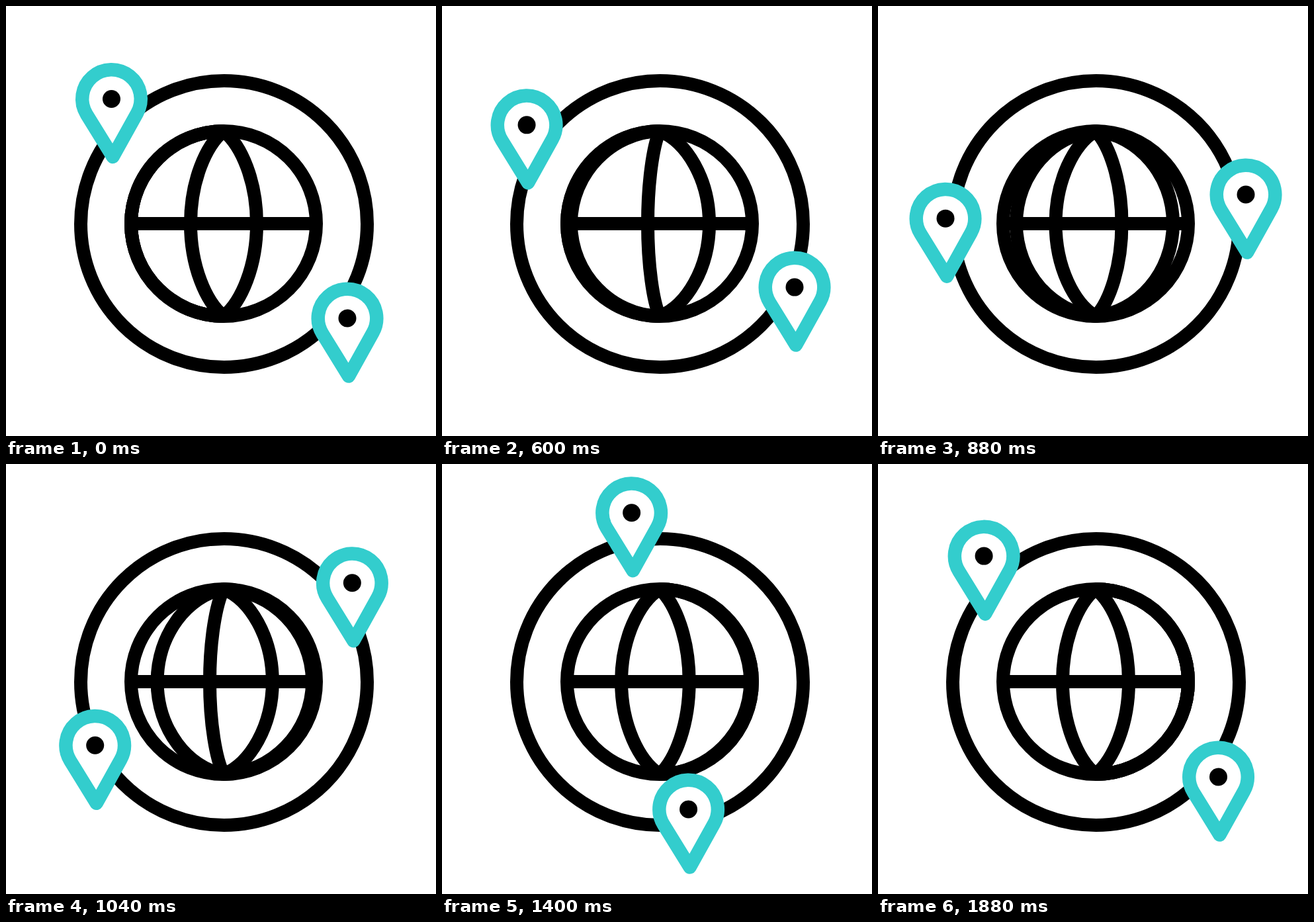
Write an HTML page that moves like this. It is 650 px wide and 650 px high and loops after 1.92 s.

```html
<!DOCTYPE html>
<html lang="en">
<head>
<meta charset="utf-8">
<title>Globe with orbiting pins</title>
<style>
  html, body { margin: 0; width: 100%; height: 100%; overflow: hidden; background: #fff; }
  svg { display: block; width: 100vw; height: 100vh; }
  .ink { fill: none; stroke: #000; stroke-width: 20; }
  .drop { fill: #fff; stroke: #33cdcd; stroke-width: 20.5; stroke-linejoin: round; }
</style>
</head>
<body>
<svg viewBox="0 0 650 650">
  <defs>
    <g id="pin">
      <path class="drop" d="M2 87.5L-37.6 23.3A44.25 44.25 0 1 1 38.7 21.5Z"/>
      <circle r="13.5"/>
    </g>
  </defs>
  <circle class="ink" cx="329.5" cy="329.5" r="216.5"/>
  <g class="ink" transform="translate(329 329)">
    <circle r="140"/>
    <path d="M-140 0H140"/>
    <path class="meridian"/>
    <path class="meridian"/>
    <path class="meridian"/>
    <path class="meridian"/>
  </g>
  <use class="pin" href="#pin"/>
  <use class="pin" href="#pin"/>
</svg>
<script>
const LOOP = 1920;
const ORBIT = { x: 329, y: 302.5 };

// Pin keys in steps, with polar angle (degrees) and radius around ORBIT.
const pinSteps = [3, 5, 8, 10, 12, 15, 17, 18, 20, 22, 26, 27];
const pins = [
  {
    angle: [223.7, 222, 211.4, 196.7, 175.3, 133, 103.7, 90.3, 68.9, 53.6, 42.6, 42.2],
    radius: [234.5, 236.8, 235.4, 228.6, 227.75, 231, 232.1, 225, 226, 234.9, 252, 252.4]
  },
  {
    angle: [42.2, 40.7, 31, 16.5, -4.4, -47.1, -76.3, -89.3, -110, -124.3, -135.95, -136.3],
    radius: [252.4, 250, 238, 228.9, 227.7, 231, 232.1, 232, 234, 239, 235, 234.5]
  }
];

// Horizontal bulge of each meridian at the equator.
const meridians = [
  { steps: [3, 5, 8, 12, 17, 20], bulge: [-50, -42.5, -18, 39.5, 120, 140] },
  { steps: [3, 5, 8, 12, 15.5], bulge: [50, 56, 75, 117, 140] },
  { steps: [5, 8, 12, 17, 22], bulge: [-140, -134, -60.5, 29.5, 50] },
  { steps: [8.5, 12, 17, 22], bulge: [-140, -120, -70, -50] }
];

// Cubic interpolation through uneven keys, at rest at both ends.
function sample(xs, ys, x) {
  const last = xs.length - 1;
  if (x <= xs[0]) return ys[0];
  if (x >= xs[last]) return ys[last];
  const slope = i => (ys[i + 1] - ys[i]) / (xs[i + 1] - xs[i]);
  const tangent = i => {
    if (i === 0 || i === last) return 0;
    const before = xs[i] - xs[i - 1], after = xs[i + 1] - xs[i];
    return (after * slope(i - 1) + before * slope(i)) / (before + after);
  };
  let i = 0;
  while (x >= xs[i + 1]) i++;
  const span = xs[i + 1] - xs[i], u = (x - xs[i]) / span, v = 1 - u;
  return ys[i] * v * v * (1 + 2 * u) + ys[i + 1] * u * u * (3 - 2 * u)
    + span * u * v * (tangent(i) * v - tangent(i + 1) * u);
}

function meridianPath(h) {
  const round = Math.max(0, Math.abs(h) - 50) / 90;
  const cx = h * 0.54, cy = 118 + 22 * round, side = 64 + 13 * round;
  return `M0-140C${cx} ${-cy} ${h} ${-side} ${h} 0S${cx} ${cy} 0 140`;
}

const pinNodes = document.querySelectorAll('.pin');
const meridianNodes = document.querySelectorAll('.meridian');

function draw(ms) {
  // Steps of 72 ms, shown on a 40 ms grid.
  const step = Math.floor(Math.floor(ms / 40) * 5 / 9);
  pins.forEach((pin, i) => {
    const a = sample(pinSteps, pin.angle, step) * Math.PI / 180;
    const r = sample(pinSteps, pin.radius, step);
    const x = ORBIT.x + r * Math.cos(a), y = ORBIT.y + r * Math.sin(a);
    pinNodes[i].setAttribute('transform', `translate(${x} ${y})`);
  });
  meridians.forEach((m, i) => {
    meridianNodes[i].setAttribute('d', meridianPath(sample(m.steps, m.bulge, step)));
  });
}

const start = performance.now();
function tick() {
  draw((performance.now() - start) % LOOP);
  requestAnimationFrame(tick);
}
tick();
</script>
</body>
</html>
```
